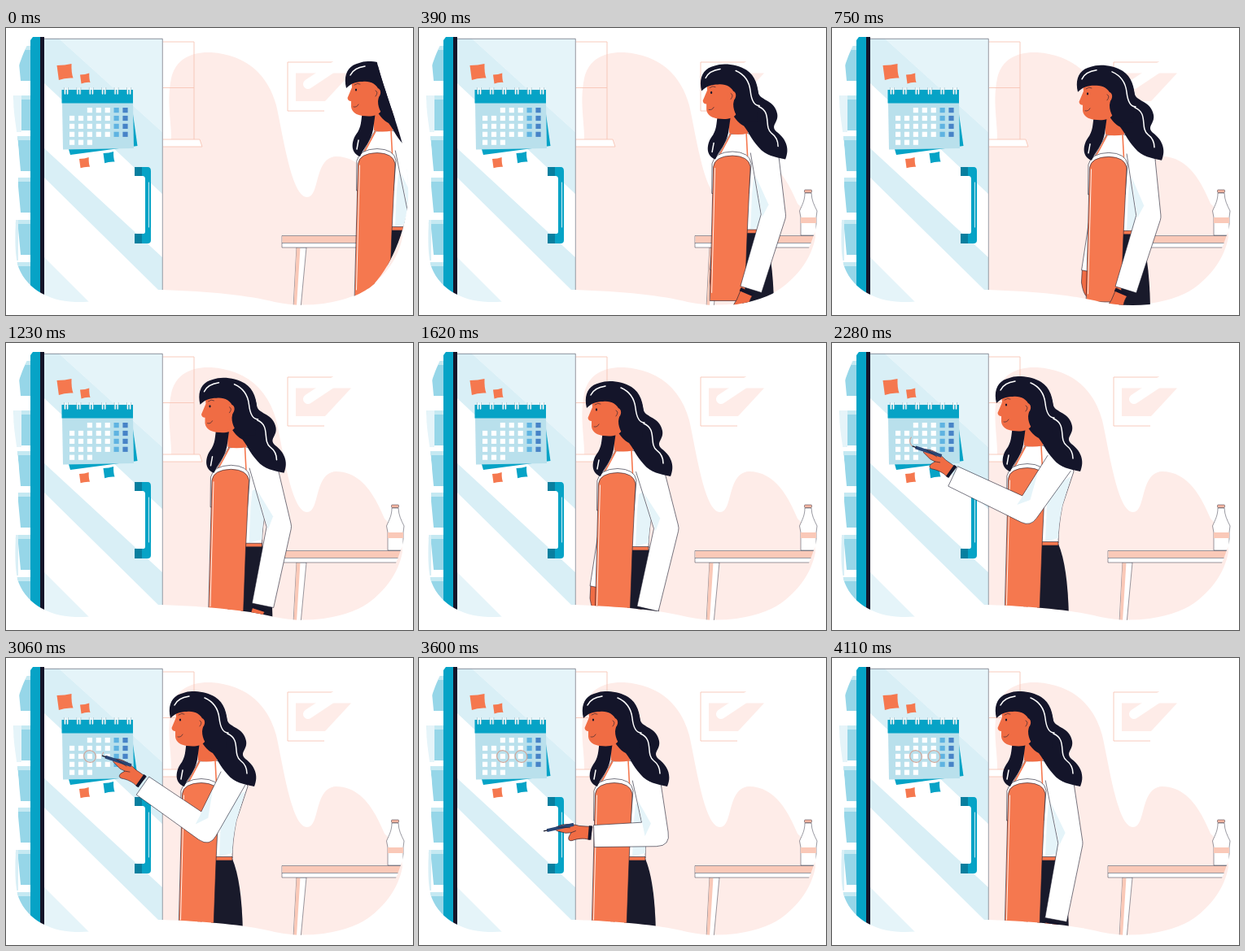
An HTML page for the animation above (5430 ms loop, 500 by 353 pixels).

```html
<!DOCTYPE html>
<html lang="en">
<head>
<meta charset="utf-8">
<title>Marking the calendar</title>
<style>
html, body { margin: 0; width: 100%; height: 100%; overflow: hidden; background: #fff; }
svg { display: block; width: 100%; height: 100%; }
.ink { stroke: #1b1c2e; stroke-width: .6; stroke-linejoin: round; stroke-linecap: round; }
.thin { stroke: #1b1c2e; stroke-width: .45; stroke-linejoin: round; }
.line { fill: none; }
.rose { fill: none; stroke: #f8c6b6; stroke-width: .9; }
.white { fill: #fff; }
.dark { fill: #14152a; }
.skin { fill: #f06c44; }
.orange { fill: #f5784f; }
.teal { fill: #06a3c6; }
.pale { fill: #e5f4f9; }
.band { fill: #d9eff6; }
.peach { fill: #fac9b8; }
.shine { fill: none; stroke: #fff; stroke-width: 1.5; stroke-linecap: round; }
.mark { fill: none; stroke: #cfa79b; stroke-width: 1.2; }
</style>
</head>
<body>
<svg viewBox="0 0 500 353" preserveAspectRatio="xMidYMid meet">
  <defs>
    <clipPath id="left"><path d="M33 11H193V322C150 324 125 338 85 337C50 336 22 318 14 290C8 262 14 220 16 170C17 130 6 105 10 75C13 50 22 25 33 11Z"/></clipPath>
    <clipPath id="room"><path d="M60 41H455.500C462 68 479 112 488 146Q495 178 494 210C492 245 475 290 452 315Q432 333 390 340Q358 343 330 337C300 329 250 324 192 322H60Z"/></clipPath>
  </defs>

  <!-- wall -->
  <path fill="#feece8" d="M192 322V146H202C206 125 196 95 203 62C208 38 228 29 252 30C296 33 322 58 332 95C341 135 351 208 370 208C386 208 378 160 405 158C438 158 454 190 465 216Q486 236 487 257C482 284 466 303 450 316Q430 333 390 339Q358 343 330 337C300 329 250 324 192 322Z"/>
  <path class="rose" d="M192 17H231V137M192 73.500H231"/>
  <path class="rose" style="fill:#fff" d="M190 137H238L241 146H190Z"/>
  <path class="rose" d="M402 42H346V102H391"/>
  <path fill="#feece8" d="M356 55.500H424L392 90H356Z"/>
  <path class="shine" style="stroke-width:12" d="M371 69L404 47"/>

  <!-- table and bottle -->
  <g clip-path="url(#room)">
    <path class="white thin" d="M357 270L353 345H362L369 270Z"/>
    <path class="peach" d="M357 270.500H361.500L357 342H353.500Z"/>
    <path class="white thin" d="M339 255.500H488L486 270H339Z"/>
    <path class="peach" d="M339.500 256H487.500L486.500 264H339.500Z"/>
    <path class="thin line" d="M339 264.500H486"/>
    <path class="white thin" d="M474 203C474 212 471 217 467.500 225L469 233V255H488V233L489 225C485 217 482.500 212 482 203Z"/>
    <path class="peach" d="M469 233H488V240H469Z"/>
    <rect class="thin" fill="#f9b6a2" x="473.500" y="199" width="9" height="3.500" rx="1"/>
  </g>

  <!-- fridge -->
  <g clip-path="url(#left)">
    <rect class="white" width="193" height="353"/>
    <g id="shelves"></g>
    <rect class="teal" x="30" y="11" width="12" height="330"/>
    <rect class="dark" x="42" y="11" width="5" height="330"/>
    <path class="pale" d="M47 13H192V128L65 13Z"/>
    <path class="band" d="M47 13H65L192 128V204L47 68ZM47 148L192 282V322H187L47 184Z"/>
    <path class="pale" d="M47 282L102 337H47Z"/>
    <path class="thin line" d="M47 13.300H192.300V323"/>
  </g>
  <g id="notes"></g>
  <path class="teal" d="M158 171H174Q178 171 178 176V261Q178 265 174 265H158V253H169Q171 253 171 250V186Q171 182 168 182H158Z"/>
  <path fill="#087f9f" d="M158 171H167V182H158ZM158 253H167V265H158Z"/>
  <path class="shine" style="stroke-width:.8" d="M175.500 190V245"/>

  <!-- calendar -->
  <path class="teal" d="M154 92L161.500 145L79 156L77 149Z"/>
  <path fill="#b9e0ec" d="M69 92H156L157 148L70 149.500Z"/>
  <path class="teal" d="M68.500 76H156V92.500H68.500Z"/>
  <g id="cells"></g>
  <ellipse class="mark" id="mark1"/>
  <ellipse class="mark" id="mark2"/>

  <!-- woman -->
  <g clip-path="url(#room)"><g id="woman">
    <g id="backHand"><path class="skin ink" d="M-5 -4L-6 14Q-4 28 1 32L4 20L6 -4Z"/></g>
    <path class="white ink" id="backSleeve"/>

    <path fill="#191a2b" d="M253 247H278Q290 275 291 340H252Z"/>
    <path class="white ink" d="M237 127L258 126Q290 134 297 158L283 200Q278 225 278 246H256L217 170Q222 150 237 127Z"/>
    <path class="pale" d="M266 180L294 164L283 200Q278 225 278 240L262 244L264 200Z"/>
    <path class="orange ink" d="M256 244.500H278V249H256Z"/>
    <path class="skin" d="M235 100H259V126Q246 129 236 126Z"/>
    <path class="line" stroke="#f5784f" stroke-width="1.600" d="M238 127L224 153M257 126L258.500 155"/>
    <path class="white ink" d="M215 163Q218 149 240 148.500Q261 149 263 163L260 200H215Z"/>
    <path class="orange ink" d="M216.500 167Q218 154 240 153.500Q260 154 262 167L258 250L255 332H212.500Z"/>
    <path class="shine" style="stroke-width:.9" d="M218.500 169L214.500 322"/>

    <g id="hand">
      <path class="skin ink" d="M-7 1C-12 -5 -20 -8 -26 -9Q-31 -11 -27 -15L-22 -18L-28 -21L-36 -29Q-38 -34 -32 -33C-25 -33 -14 -26 -9 -20L4 -11Z"/>
      <g id="pen"><path stroke="#2a4675" stroke-width="4" d="M-46 -35.500L-14 -25"/><path stroke="#1b1c2e" stroke-width="1.400" d="M-50 -37L-45 -35.200"/></g>
      <path class="ink line" d="M-32 -32L-20 -24M-22 -18L-16 -17"/>
      <path stroke="#14152a" stroke-width="4" d="M-7 1L3 -13"/>
    </g>
    <path class="white ink" id="sleeve"/>
    <path class="pale" id="fold"/>

    <!-- hair and head -->
    <path class="dark" d="M222 102C220 114 221 122 214 131C208 140 207 154 219 158C224 146 232 140 235 125L238 103Z"/>
    <path class="dark" d="M240 46C262 45 269 60 272 77C275 86 292 85 295 102C297 113 286 116 294 124C305 132 311 144 305 158C292 155 281 154 272 143C262 132 261 126 254 117C248 114 245 110 240 103Z"/>
    <path class="skin" d="M208 62L209 73L203.500 86Q204 90 208 90L208 97C209 104 215 107 222 108C231 109 240 109 245 102L246 65Z"/>
    <path class="dark" d="M202 74C198 58 204 46 218 43C228 39 246 41 257 48C268 55 272 68 272 83L270 112L254 112C246 108 241 100 241 90L243 78C239 68 231 65 222 66C214 66 208 68 202 74Z"/>
    <path class="skin" d="M234 76C243 70 247 79 242 85Q239 91 234 88Z"/>
    <path class="ink line" d="M238 77Q242 79 238 84M212 70Q216 67 219 69M211 97Q215 98 217 94"/>
    <ellipse class="dark" cx="214" cy="76" rx="1.100" ry="1.600"/>
    <path class="shine" d="M207 58Q211 49 225 47M244 49Q260 56 262 74T273 92M272 93C289 100 278 118 288 126Q296 132 296 142M217 138L215 149"/>
  </g></g>
</svg>
<script>
const LOOP = 5430, END = 4110, STEP = 30;
const $ = id => document.getElementById(id);
const rect = (x, y, w, h, fill) => `<rect x="${x}" y="${y}" width="${w}" height="${h}" fill="${fill}"/>`;

// Static repeats
$('shelves').innerHTML = [-30, 22, 83, 133, 184, 236, 288].map(y =>
  `<path fill="#96d6e8" d="M14 ${y}H30V${y + 43}H18Z"/>` + rect(9, y, 21, 5, '#c5e9f2')).join('') +
  rect(8, 83, 11, 45, '#e5f4f9') + rect(8, 236, 7, 50, '#d9eff6');

const note = (x, y, s, cls) =>
  `<path class="${cls}" d="M${x} ${y + 1}Q${x + s / 2} ${y + 1} ${x + s * .9} ${y - 1}Q${x + s * .88} ${y + s * .5} ${x + s} ${y + s * .83}Q${x + s / 2} ${y + s * .8} ${x + s * .12} ${y + s * .95}Z"/>`;
$('notes').innerHTML = note(62.500, 45, 20, 'orange') + note(91, 56.500, 12.500, 'orange') +
  note(90, 160, 13, 'orange') + note(119.500, 153, 14, 'teal');

let cells = '';
for (let row = 0; row < 5; row++) for (let col = 0; col < 7; col++) {
  if ((row === 0 && col < 2) || (row === 4 && col > 2)) continue;
  cells += rect(78 + col * 10.900, 98 + row * 9.900, 6.200, 6.200, col < 5 ? '#fff' : col === 5 ? '#5fb3e1' : '#4783c7');
}
for (let i = 0; i < 6; i++) {
  const x = 72.500 + i * 15.400;
  cells += `<path class="shine" d="M${x} 74V81M${x + 3} 74V81"/><path fill="none" stroke="#8fb6c2" stroke-width=".6" d="M${x - 1} 81V73M${x + 4} 81V73"/>`;
}
$('cells').innerHTML = cells;

// Rows are [time, ...values]; monotone cubic between them
function track(keys, t) {
  if (t <= keys[0][0]) return keys[0].slice(1);
  const last = keys.length - 1;
  if (t >= keys[last][0]) return keys[last].slice(1);
  let i = 0;
  while (t >= keys[i + 1][0]) i++;
  const a = keys[i], b = keys[i + 1], span = b[0] - a[0], u = (t - a[0]) / span;
  const slope = (k, c) => (keys[k + 1][c] - keys[k][c]) / (keys[k + 1][0] - keys[k][0]);
  const tangent = (k, c) => {
    if (k === 0) return slope(0, c);
    if (k === last) return 0;
    const p = slope(k - 1, c), q = slope(k, c);
    return p * q <= 0 ? 0 : 2 * p * q / (p + q);
  };
  return a.slice(1).map((v, n) => {
    const c = n + 1, u2 = u * u, u3 = u2 * u;
    return v * (2 * u3 - 3 * u2 + 1) + b[c] * (3 * u2 - 2 * u3) +
      span * (tangent(i, c) * (u3 - 2 * u2 + u) + tangent(i + 1, c) * (u3 - u2));
  });
}

const walkX = [[0, 216], [570, 118], [750, 100], [1140, 47], [1230, 36.500], [1620, 4], [1730, -3], [2100, 0]];
const walkY = [[0, 0], [700, 5], [1130, 1], [1250, 2], [1600, 6], [2000, 0]];
const backSwing = [[0, .2], [700, 1], [1000, .6], [1230, 0], [1620, 1], [1850, 0]];
// elbow x, y, wrist x, y
const arm = [
  [0, 293, 227, 266, 320], [750, 289, 227, 261, 317], [1230, 299, 224, 279, 321],
  [1620, 300, 222, 277, 321], [1800, 308, 224, 283, 318], [1920, 314, 215, 235, 250],
  [2020, 272, 216, 180, 185], [2100, 236, 205, 147, 153], [2300, 239, 207, 152, 159],
  [2750, 238, 206, 147, 153], [3040, 245, 211, 169, 155], [3400, 247, 210, 169, 153],
  [3560, 280, 217, 205, 205], [3720, 320, 215, 245, 262], [3900, 310, 225, 282, 318],
  [END, 293, 228, 275, 322]
];
const marks = [
  { el: $('mark1'), x: 103, from: 2100, to: 2750 },
  { el: $('mark2'), x: 125.500, from: 3020, to: 3400 }
];
const MARK_Y = 121, RX = 7.600, RY = 7.200, START = 225 * Math.PI / 180;
const REACH = Math.atan2(-46, -83);
const clamp = v => Math.max(0, Math.min(1, v));

for (const { el, x } of marks) {
  el.setAttribute('rx', RX);
  el.setAttribute('ry', RY);
  el.setAttribute('pathLength', 100);
  el.setAttribute('transform', `translate(${x} ${MARK_Y}) scale(1 -1) rotate(135)`);
}

function penTip(t) {
  const [a, b] = marks;
  const on = (m, u) => [m.x + RX * Math.cos(START - u * 2 * Math.PI), MARK_Y + RY * Math.sin(START - u * 2 * Math.PI)];
  if (t <= a.to) return on(a, clamp((t - a.from) / (a.to - a.from)));
  if (t >= b.from) return on(b, clamp((t - b.from) / (b.to - b.from)));
  const u = (t - a.to) / (b.from - a.to), e = u * u * (3 - 2 * u);
  const p = on(a, 0), q = on(b, 0);
  return [p[0] + (q[0] - p[0]) * e, p[1] + (q[1] - p[1]) * e];
}

const dir = (p, q) => {
  const l = Math.hypot(q[0] - p[0], q[1] - p[1]);
  return [(q[0] - p[0]) / l, (q[1] - p[1]) / l];
};
const off = (p, n, k) => [p[0] + n[0] * k, p[1] + n[1] * k];
const pt = p => p[0].toFixed(1) + ' ' + p[1].toFixed(1);

// Tapered sleeve through shoulder, elbow and wrist, rounded on the outer side
function sleeve(s, e, w, [ws, we, ww]) {
  const d1 = dir(s, e), d2 = dir(e, w);
  const n1 = [d1[1], -d1[0]], n2 = [d2[1], -d2[0]];
  const sum = [n1[0] + n2[0], n1[1] + n2[1]];
  const k = Math.min(1.500, 2 / (sum[0] ** 2 + sum[1] ** 2));
  const outer = d1[0] * d2[1] - d1[1] * d2[0] > 0 ? 1 : -1;
  const bend = (side, a, b) => {
    const m = pt(off(e, sum, side * we * k));
    return side === outer ? `L${pt(off(e, a, side * we))}Q${m} ${pt(off(e, b, side * we))}` : `L${m}`;
  };
  return `M${pt(off(s, n1, ws))}${bend(1, n1, n2)}L${pt(off(w, n2, ww))}L${pt(off(w, n2, -ww))}${bend(-1, n2, n1)}L${pt(off(s, n1, -ws))}`;
}

// Shaded crease on the inside of the upper arm
function crease(s, e, width) {
  const d = dir(s, e), n = [d[1], -d[0]];
  const top = off([s[0] + (e[0] - s[0]) * .35, s[1] + (e[1] - s[1]) * .35], n, -width);
  return `M${pt(top)}L${pt(off(off(e, n, -4), d, -14))}L${pt(off(e, n, -width + 1))}Z`;
}

function draw(t) {
  const [dx] = track(walkX, t), [dy] = track(walkY, t);
  $('woman').setAttribute('transform', `translate(${dx.toFixed(2)} ${dy.toFixed(2)})`);

  const [b] = track(backSwing, t);
  const backWrist = [238 - 26 * b, 297 - 3 * b];
  $('backSleeve').setAttribute('d', sleeve([236, 160], [238 - 13 * b, 230], backWrist, [10, 9, 6]));
  $('backHand').setAttribute('transform', `translate(${backWrist})`);

  let [ex, ey, wx, wy] = track(arm, t);
  const marking = t >= marks[0].from && t <= marks[1].to;
  if (marking) {
    const tip = penTip(t);
    wx = tip[0] + 50;
    wy = tip[1] + 37;
  }
  const shoulder = [279, 148], elbow = [ex, ey];
  const turn = marking ? 0 : (Math.atan2(wy - ey, wx - ex) - REACH) * 180 / Math.PI;
  $('sleeve').setAttribute('d', sleeve(shoulder, elbow, [wx, wy], [17, 15, 13.500]));
  $('fold').setAttribute('d', crease(shoulder, elbow, 15));
  $('hand').setAttribute('transform', `translate(${wx.toFixed(2)} ${wy.toFixed(2)}) rotate(${turn.toFixed(2)})`);
  $('pen').setAttribute('visibility', t > 1850 && t < 3850 ? 'visible' : 'hidden');

  for (const m of marks) {
    const u = clamp((t - m.from) / (m.to - m.from));
    m.el.setAttribute('visibility', u > 0 ? 'visible' : 'hidden');
    m.el.setAttribute('stroke-dasharray', u < 1 ? `${u * 100} 200` : 'none');
  }
}

const begin = performance.now();
function tick() {
  const t = (performance.now() - begin) % LOOP;
  draw(Math.min(END, Math.floor(t / STEP) * STEP));
  requestAnimationFrame(tick);
}
tick();
</script>
</body>
</html>
```
